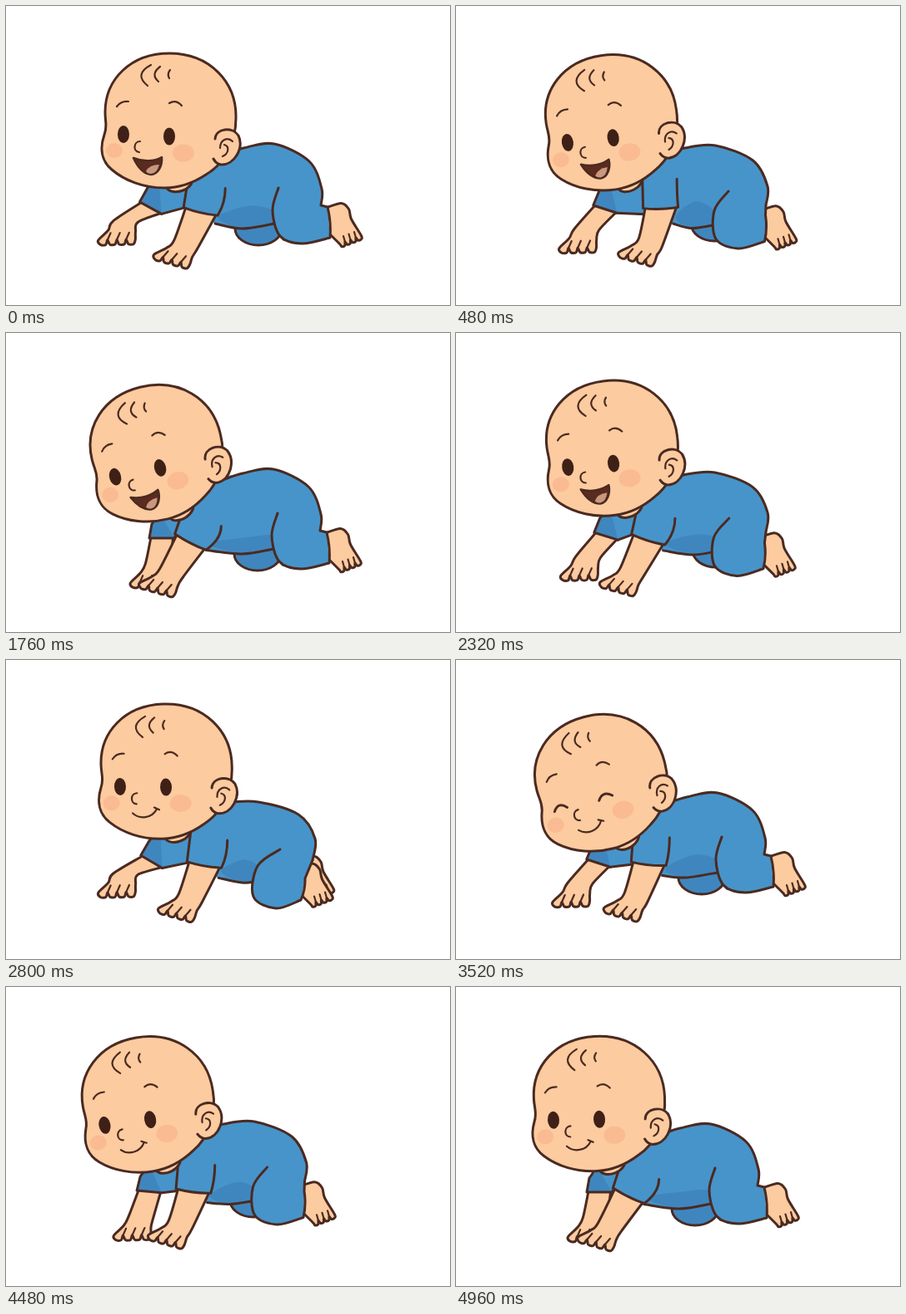
These frames come from a looping animation (533x360 px, 5.04 s). An HTML page:

```html
<!DOCTYPE html>
<html lang="en">
<head>
<meta charset="utf-8">
<title>Crawling baby</title>
<style>
html, body { margin: 0; width: 100%; height: 100%; overflow: hidden; background: #fff; }
svg { display: block; width: 100vw; height: 100vh; }
path, ellipse { stroke-linecap: round; stroke-linejoin: round; }
.line { fill: none; stroke: #4a2a21; stroke-width: 3; }
.thin { fill: none; stroke: #4a2a21; stroke-width: 2.2; }
.skin { fill: #fccb9f; stroke: #4a2a21; stroke-width: 3; }
.blue { fill: #4794ca; }
.dark { fill: #3f86bf; }
.dark.edge { stroke: #4a2a21; stroke-width: 3; }
.ink { fill: #3f2017; }
.blush { fill: #f8b08b; opacity: .6; }
.dust { fill: #facfa5; }
</style>
</head>
<body>
<svg viewBox="0 0 533 360" xmlns="http://www.w3.org/2000/svg">
  <ellipse id="dust" class="dust" cy="292" ry="2.5"/>
  <g id="farFoot"></g>
  <ellipse id="farLeg" class="dark edge" rx="28" ry="20"/>
  <path id="farArm" class="skin"/>
  <path id="farFingers" class="thin"/>
  <path id="farSleeve" class="dark"/>
  <path id="farHem" class="line"/>
  <path id="torso" class="blue"/>
  <path id="shade" class="dark"/>
  <path id="torsoLine" class="line"/>
  <g id="foot"></g>
  <path id="leg" class="blue"/>
  <path id="legLine" class="line"/>
  <path id="arm" class="skin"/>
  <path id="fingers" class="thin"/>
  <path id="sleeve" class="blue"/>
  <path id="sleeveLine" class="line"/>
  <g id="head">
    <ellipse class="skin" cx="208" cy="213" rx="16" ry="10" transform="rotate(-18 208 213)"/>
    <path class="skin" d="M196 57C245 57 277 92 276 135C276 165 262 190 240 203C225 213 208 219 190 219C165 219 142 210 127 197C115 187 112 172 118 155C122 145 119 140 119 128C119 88 150 57 196 57Z"/>
    <ellipse class="blush" cx="130" cy="174" rx="10" ry="9"/>
    <ellipse class="blush" cx="213" cy="177" rx="13" ry="10.5"/>
    <path class="skin" d="M251 160C252 147 272 145 279 156C286 171 274 192 258 191Q252 190 249 184"/>
    <path class="thin" d="M257 171C257 161 266 157 272 163M262 167C269 169 267 178 260 181"/>
    <path class="thin" d="M174 71Q153 82 170 96M185 73Q173 82 183 91M197 77Q193 82 196 87"/>
    <path class="thin" d="M133 121Q138 114 147 115M196 117Q204 112 211 120"/>
    <path class="thin" d="M161 163C153 163 152 175 160 176"/>
    <g id="openEyes" class="ink">
      <ellipse cx="141" cy="154.500" rx="7" ry="10.500"/>
      <ellipse cx="196" cy="157" rx="7" ry="10.500"/>
    </g>
    <path id="shutEyes" class="line" d="M133 158Q140 147 149 157M188 159Q195 148 205 157"/>
    <g id="laugh">
      <path d="M153 183C165 188 178 187 187 182C188 193 182 203 174 203C165 202 158 194 153 183Z" fill="#5b2b20" stroke="#4a2a21" stroke-width="2.5"/>
      <path d="M168 199Q172 191 184 191Q181 202 174 202Q170 202 168 199Z" fill="#c9987f"/>
    </g>
    <path id="smile" class="thin" d="M155 187C163 195 178 194 184 183M181 181L187 184"/>
  </g>
</svg>
<script>
const LOOP = 5040, STEP = 80;
const el = id => document.getElementById(id);

// Head place and tilt, body drift, swing of the near and far arm in degrees.
// The legs are stretched and tucked in turn from pose to pose.
const poses = [
  { t: 0, x: 168.5, y: 155.5, tilt: 0, dx: 0, dy: 0, near: 13, far: 32 },
  { t: 960, x: 154, y: 167, tilt: -17, dx: 0, dy: 0, near: -17, far: 8 },
  { t: 1760, x: 158, y: 167.5, tilt: -14, dx: -1, dy: -2, near: 27, far: 0 },
  { t: 2800, x: 164.5, y: 152.5, tilt: -2, dx: 2, dy: 1, near: 10, far: 34 },
  { t: 3520, x: 152, y: 171, tilt: -15, dx: -8, dy: -6, near: 6, far: 20 },
  { t: 4000, x: 147, y: 166, tilt: -16, dx: -11, dy: -11, near: -12, far: 11 },
  { t: 4960, x: 144.5, y: 159.5, tilt: -3.5, dx: -16, dy: -1, near: 26, far: 0 }
];

// back: nape to rump; leg: crease, thigh, knee, shin, hem bottom, hem top
const stretched = {
  back: [[285, 171], [322, 166], [364, 187], [379, 220], [378, 240]],
  leg: [[327, 219], [320, 246], [329, 277], [355, 286], [389, 279], [386, 242]],
  rest: [[284, 268], [303, 268], [318, 252]]
};
const tucked = {
  back: [[264, 171], [301, 170], [349, 185], [369, 214], [366, 240]],
  leg: [[327, 227], [300, 247], [295, 284], [322, 298], [352, 288], [357, 262]],
  rest: [[281, 267], [318, 258], [352, 258]]
};

const mix = (a, b, u) => a.map((v, i) => v + (b[i] - v) * u);
const move = (p, x, y) => [p[0] + x, p[1] + y];
const set = (id, d) => el(id).setAttribute('d', d);
const place = (id, x, y) => el(id).setAttribute('transform', `translate(${x} ${y})`);
const show = (id, on) => el(id).style.display = on ? '' : 'none';
const poly = pts => 'M' + pts.map(p => p.join(' ')).join('L');
const after = d => d.replace('M', 'L');

// Point at a length below p, swung by an angle.
function swing(p, length, deg) {
  const a = deg * Math.PI / 180;
  return [p[0] - length * Math.sin(a), p[1] + length * Math.cos(a)];
}

function turn(pts, [x, y], deg) {
  const a = deg * Math.PI / 180, c = Math.cos(a), s = Math.sin(a);
  return pts.map(([u, v]) => [x + u * c - v * s, y + u * s + v * c]);
}

// Smooth curve through the points.
function curve(pts, closed) {
  const n = pts.length;
  const get = i => closed ? pts[(i + n) % n] : pts[Math.max(0, Math.min(n - 1, i))];
  let d = 'M' + pts[0].join(' ');
  for (let i = 0; i < (closed ? n : n - 1); i++) {
    const [a, b, c, e] = [get(i - 1), get(i), get(i + 1), get(i + 2)];
    const c1 = [0, 1].map(k => b[k] + (c[k] - a[k]) / 6);
    const c2 = [0, 1].map(k => c[k] - (e[k] - b[k]) / 6);
    d += 'C' + [...c1, ...c2, ...c].map(v => v.toFixed(1)).join(' ');
  }
  return d + (closed ? 'Z' : '');
}

// Row of four rounded fingers or toes between two points, with the creases between.
function digits(from, to, bulge, crease) {
  const dx = to[0] - from[0], dy = to[1] - from[1], len = Math.hypot(dx, dy);
  const out = [-dy / len * bulge, dx / len * bulge];
  const edge = [], lines = [];
  for (let i = 0; i < 4; i++) {
    const at = u => mix(from, to, (i + u) / 4);
    edge.push(at(0), move(at(.25), ...out), move(at(.8), ...out));
    if (i) lines.push(at(0), move(at(0), ...crease));
  }
  return { edge: [...edge, to], lines };
}

const fingers = digits([-39, 9], [4, 21], 5.5, [6, -7]);
const handShape = [[-15, -8], [-24, 1], ...fingers.edge, [7, 12], [13, 2]];
const toes = digits([39, 16], [13, 26], -4, [-2, -7]);
const footShape = [[-2, -18], [15, -23], [24, -16], [27, -4], ...toes.edge, [2, 15]];

const creases = pts => [0, 2, 4].map(i => poly([pts[i], pts[i + 1]])).join('');

function drawArm(id, lines, left, right, wrist, deg) {
  set(id, curve([mix(left, right, .06), ...turn(handShape, wrist, deg), mix(right, left, .05)]));
  set(lines, creases(turn(fingers.lines, wrist, deg)));
}

function drawLimbs({ dx, dy, near, far }, tuck) {
  const body = part => stretched[part].map((p, i) => move(mix(p, tucked[part][i], tuck), dx, dy));
  const spine = body('back'), limb = body('leg');
  const [low, farLeg, farFoot] = body('rest');
  const nape = spine[0], rump = spine[4], join = mix(limb[1], limb[2], .5);

  // Far arm hangs from its cuff and reaches ahead.
  const farCuff = [188 - far * .45 + dx, 247 - far * .12];
  const [f1, f2] = turn([[-15, 0], [15, 0]], farCuff, far * .9);
  const f0 = move(f1, 3 + far * .2, -17);
  drawArm('farArm', 'farFingers', f1, f2, swing(farCuff, 34, 5 + far * 1.6), -17);
  set('farSleeve', poly([move(f0, 12, -12), f0, f1, f2, move(f2, 25, -12), move(f0, 45, -14)]) + 'Z');
  set('farHem', poly([move(f0, 5, -7), f0, f1, f2]));

  const cuff = [244 - near * .8 + dx, 243.5 + near * .3];
  const [h1, h2] = turn([[-21, 0], [21, 0]], cuff, near);
  const shoulder = swing(h1, -36, -near * -.7), pit = swing(h2, -34, near * 1.2);

  const chest = move(h1, 2, Math.max(0, 6 - near * .5));
  const side = [h2[0] - (262 - h2[1]) * .3, 262 + dy * .4];
  const bellyLine = curve([side, low, join]);
  set('torso', poly([move(f0, 14, -6), f2, chest]) + after(bellyLine)
    + after(curve([...spine].reverse())) + 'L' + move(nape, -60, 10).join(' ') + 'Z');
  set('shade', curve([move(side, 3, -8), move(mix(pit, limb[1], .5), 0, 8), limb[1], join, low], true));
  set('torsoLine', poly([f2, chest]) + bellyLine + curve([move(nape, -24, 8), ...spine]));

  const thigh = curve(limb.slice(0, 5)), end = 'L' + rump.join(' ');
  const hemMid = move(mix(limb[4], limb[5], .5), 3, 0);
  set('leg', thigh + 'L' + limb[5].join(' ') + end + 'Z');
  set('legLine', thigh + 'Q' + [...hemMid, ...limb[5]].join(' ') + end);
  place('foot', hemMid[0] - 3 - tuck * 4, hemMid[1] - tuck * 8);
  place('farFoot', ...farFoot);
  place('farLeg', ...farLeg);

  drawArm('arm', 'fingers', h1, h2, swing(cuff, 46, 15 + near * .5), 0);
  const outline = poly([shoulder, h1]) + 'Q' + [...move(cuff, 0, 3), ...h2].join(' ')
    + 'Q' + [pit[0], h2[1] * .55 + pit[1] * .45, ...pit].join(' ');
  set('sleeve', outline + 'Z');
  set('sleeveLine', outline);
}

function draw(t) {
  let k = 0;
  while (k < poses.length - 2 && t >= poses[k + 1].t) k++;
  const a = poses[k], b = poses[k + 1];
  const u = (1 - Math.cos(Math.PI * Math.min(1, (t - a.t) / (b.t - a.t)))) / 2;
  const pose = {};
  for (const key in a) pose[key] = a[key] + (b[key] - a[key]) * u;

  drawLimbs(pose, k % 2 ? 1 - u : u);
  el('head').setAttribute('transform',
    `translate(${pose.x} ${pose.y}) rotate(${pose.tilt}) translate(-168.5 -155.5)`);

  const shut = t >= 3200 && t < 4480, laughing = t < 2400;
  show('openEyes', !shut);
  show('shutEyes', shut);
  show('laugh', laughing);
  show('smile', !laughing);

  // Scuff on the floor behind the tucked foot.
  const first = Math.abs(t - 1040) <= 160, second = Math.abs(t - 4040) <= 200;
  show('dust', first || second);
  el('dust').setAttribute('cx', first ? 428.5 : 420);
  el('dust').setAttribute('rx', first ? 12 : 22);
}

for (const id of ['foot', 'farFoot'])
  el(id).innerHTML = `<path class="skin" d="${curve(footShape)}"/><path class="thin" d="${creases(toes.lines)}"/>`;

const start = performance.now();
function tick() {
  const t = (performance.now() - start) % LOOP;
  draw(Math.floor(t / STEP) * STEP);
  requestAnimationFrame(tick);
}
draw(0);
requestAnimationFrame(tick);
</script>
</body>
</html>
```
